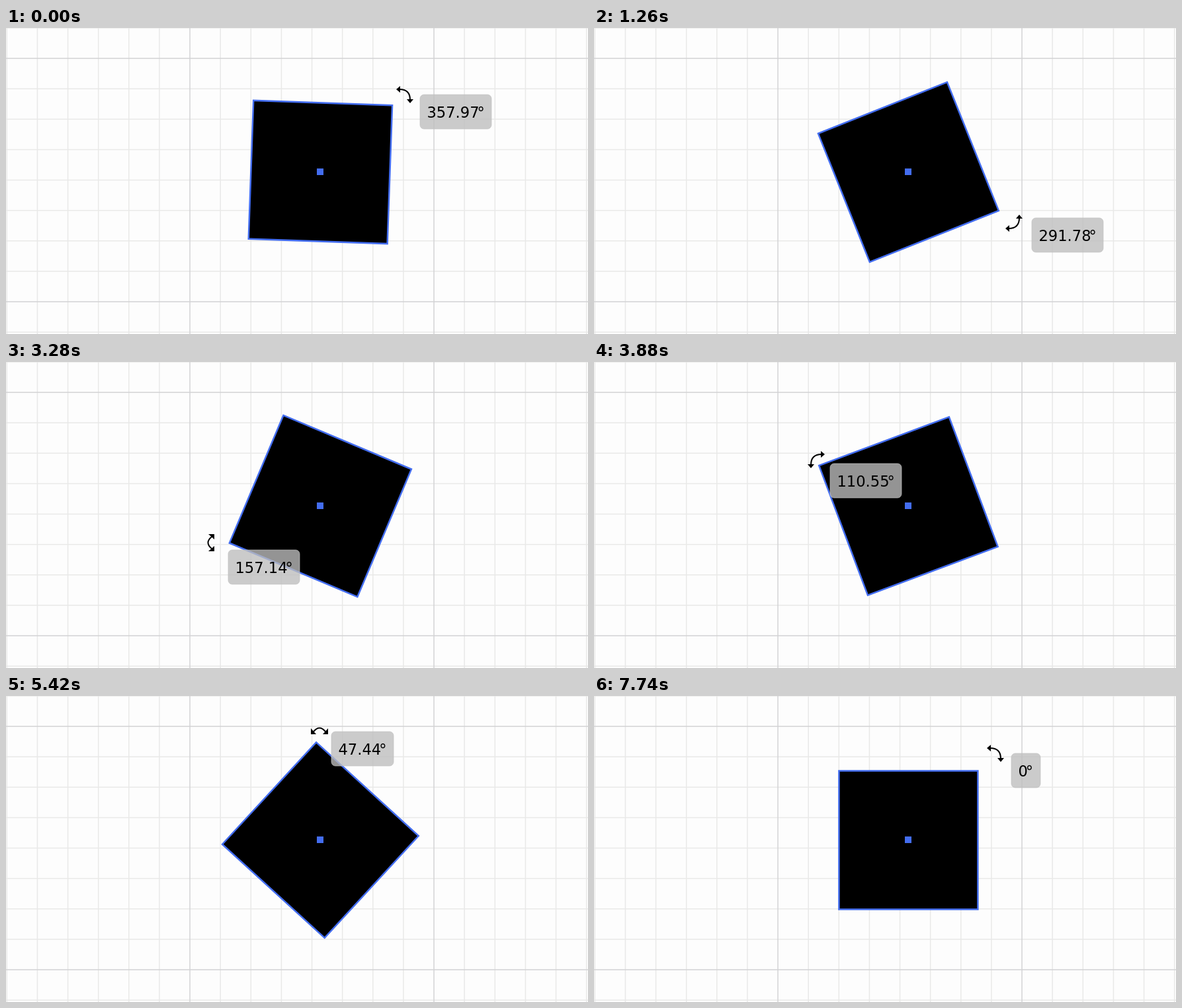
Animation, 880 px wide and 464 px high, one loop 7.78 s. Source, as an HTML page with a canvas:

```html
<!DOCTYPE html>
<html lang="en">
<head>
<meta charset="utf-8">
<title>Rotating a square</title>
<style>
  html, body { margin: 0; width: 100%; height: 100%; overflow: hidden; background: #fdfdfd; }
  canvas { display: block; }
</style>
</head>
<body>
<canvas id="stage" width="880" height="464"></canvas>
<script>
const ctx = document.getElementById('stage').getContext('2d');
const LOOP = 7780, STEP = 20, LAST = 7740;
const CX = 475.4, CY = 218.5, SIDE = 210, CELL = 369 / 8;
const BLUE = '#436df0';

// time in ms, angle in degrees, pointer distance from the centre
const keys = [
  [0, 357.97, 173], [780, 316.2, 172], [1260, 291.78, 177], [1560, 271.1, 186],
  [2240, 219, 179], [2500, 202.3, 191], [3120, 168.7, 184], [3280, 157.14, 176],
  [3920, 108.53, 156], [4640, 84.22, 154.6], [5460, 45.6, 165], [6080, 18.36, 170.6],
  [6140, 16.92, 173], [7020, 3.13, 191], [7400, 0.42, 187], [LAST, 0, 186.3]
];

// Monotone cubic interpolation of one column
function slope(i, col) {
  if (i === 0 || i === keys.length - 1) return 0;
  const rate = j => (keys[j + 1][col] - keys[j][col]) / (keys[j + 1][0] - keys[j][0]);
  const a = rate(i - 1), b = rate(i);
  return a * b > 0 ? 2 * a * b / (a + b) : 0;
}

function valueAt(t, col) {
  let i = 0;
  while (i < keys.length - 2 && t >= keys[i + 1][0]) i++;
  const p = keys[i], q = keys[i + 1], span = q[0] - p[0], s = (t - p[0]) / span;
  const ease = s * s * (3 - 2 * s);
  return p[col] + (q[col] - p[col]) * ease
    + span * s * (1 - s) * ((1 - s) * slope(i, col) - s * slope(i + 1, col));
}

function pointerAt(t) {
  const degrees = valueAt(t, 1) + 45, r = valueAt(t, 2), rad = degrees * Math.PI / 180;
  return { degrees, x: CX + r * Math.cos(rad), y: CY - r * Math.sin(rad) };
}

function drawGrid() {
  ctx.fillStyle = '#fdfdfd';
  ctx.fillRect(0, 0, 880, 464);
  for (const major of [false, true]) {
    ctx.fillStyle = major ? '#d3d3d5' : '#e9e9e8';
    for (let k = -6; k <= 13; k++) {
      if ((k % 8 === 0) !== major) continue;
      ctx.fillRect(277.3 + k * CELL, 0, 1.5, 464);
      ctx.fillRect(0, 45.3 + k * CELL, 880, 1.5);
    }
  }
}

function drawSquare(angle) {
  ctx.save();
  ctx.translate(CX, CY);
  ctx.rotate(-angle * Math.PI / 180);
  ctx.beginPath();
  ctx.rect(-SIDE / 2, -SIDE / 2, SIDE, SIDE);
  ctx.fillStyle = '#000';
  ctx.fill();
  ctx.strokeStyle = BLUE;
  ctx.lineWidth = 2.5;
  ctx.stroke();
  ctx.restore();
  ctx.fillStyle = BLUE;
  ctx.fillRect(470, 213, 10, 10);
}

function drawLabel(angle, pointer) {
  const text = String(Math.round(angle * 100) / 100);
  const x = Math.round(pointer.x + 24), y = Math.round(pointer.y);
  ctx.font = '22.6px "DejaVu Sans", sans-serif';
  const width = ctx.measureText(text).width;
  ctx.beginPath();
  ctx.roundRect(x, y, Math.round(width + 29.4), 52, 6);
  ctx.fillStyle = 'rgba(190, 190, 190, 0.78)';
  ctx.fill();
  ctx.strokeStyle = 'rgba(192, 192, 192, 0.7)';
  ctx.lineWidth = 1;
  ctx.stroke();
  ctx.fillStyle = '#000';
  ctx.fillText(text, x + 10.5, y + 35);
  ctx.fillText('°', x + 7.5 + width, y + 35);
}

const corner = {
  shaft: new Path2D('M-8-8C3-8 8-3 8 8'),
  heads: new Path2D('M-13-8L-7-13V-3ZM8 13L3 7H13Z')
};
const edge = {
  shaft: new Path2D('M-9-1Q0 10 9-1'),
  heads: new Path2D('M-13-5H-5L-13 4ZM13-5H5L13 4Z')
};

// The cursor has eight fixed orientations
function drawCursor({ degrees, x, y }) {
  const sector = Math.round(degrees / 45), odd = sector % 2 !== 0;
  const shape = odd ? corner : edge;
  ctx.save();
  ctx.translate(Math.round(x), Math.round(y));
  ctx.rotate(((odd ? 1 : 6) - sector) * Math.PI / 4);
  ctx.strokeStyle = ctx.fillStyle = '#000';
  ctx.lineWidth = 2;
  ctx.stroke(shape.shaft);
  ctx.fill(shape.heads);
  ctx.restore();
}

function frame(now) {
  const t = Math.min(Math.floor((now - start) % LOOP / STEP) * STEP, LAST);
  const angle = valueAt(t, 1);
  drawGrid();
  drawSquare(angle);
  drawLabel(angle, pointerAt(t));
  drawCursor(pointerAt(Math.min(t + 45, LAST))); // the label trails the cursor
  requestAnimationFrame(() => frame(performance.now()));
}

const start = performance.now();
frame(start);
</script>
</body>
</html>
```
